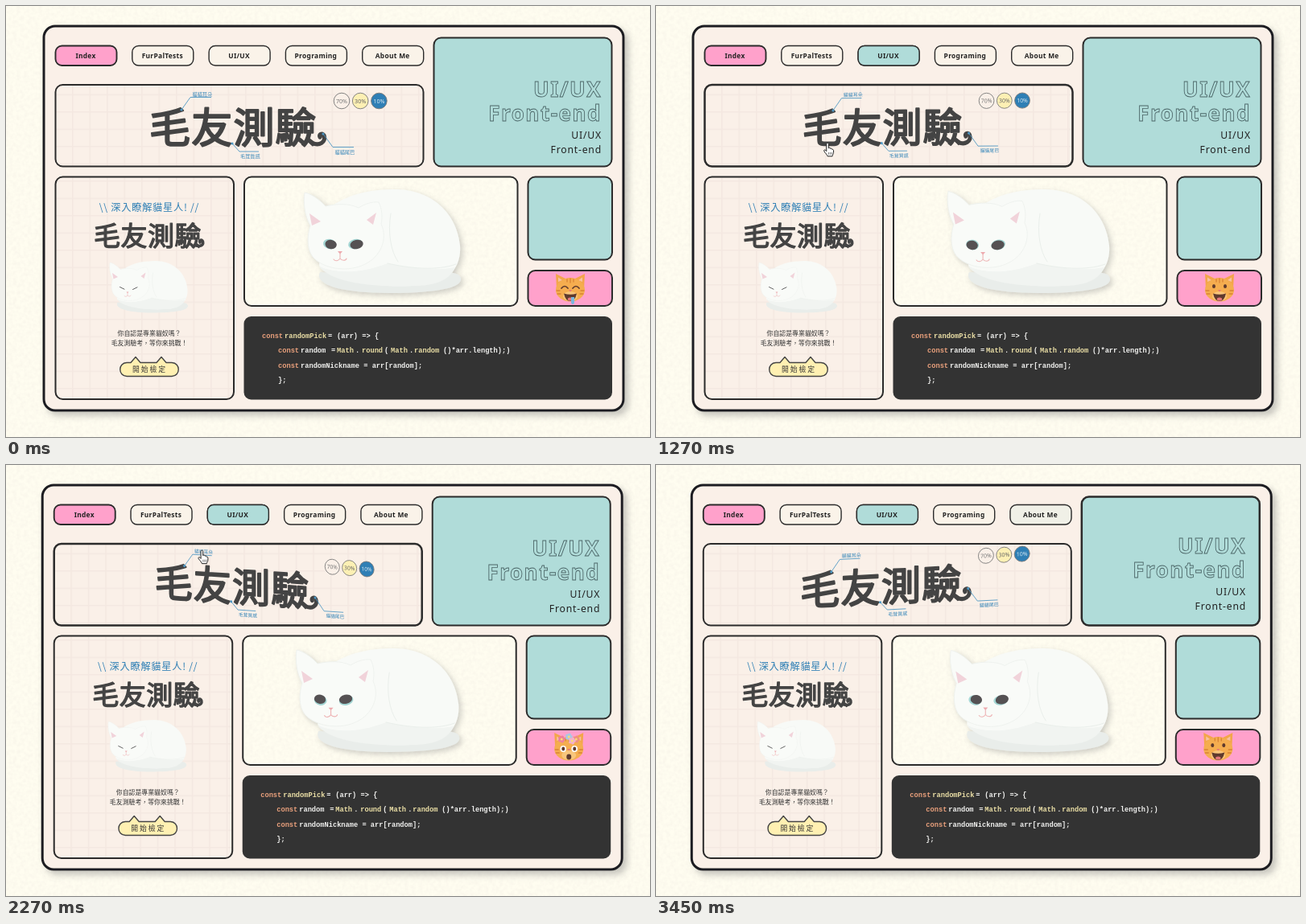
Animation, 800 px wide and 536 px high, one loop 3540 ms. Source, as an HTML page:

```html
<!DOCTYPE html>
<html lang="zh-Hant">
<head>
<meta charset="utf-8">
<title>Cat quiz portfolio</title>
<style>
  html, body { margin: 0; width: 100%; height: 100%; overflow: hidden; background: #fffdf0; }
  svg { display: block; width: 800px; height: 536px; font-family: "Noto Sans", "Noto Sans CJK TC", "Noto Sans CJK JP", sans-serif; }
  .cjk { font-family: "Noto Sans CJK TC", "Noto Sans CJK JP", sans-serif; }
  .box { stroke: #2b2b2b; stroke-width: 2; }
  .nav text { font-size: 8.4px; font-weight: 600; letter-spacing: .3px; text-anchor: middle; fill: #222; }
  .nav rect { stroke: #2b2b2b; stroke-width: 1.4; }
  .brush { fill: #444; stroke: #444; stroke-width: .042em; stroke-linejoin: round; font-weight: 400; }
  .curl { fill: none; stroke: #444; stroke-width: 5.2; stroke-linecap: round; }
  .note { fill: #3485b8; font-size: 6.2px; }
  .lead { fill: none; stroke: #4f98c4; stroke-width: .9; }
  .pct { font-size: 7.2px; text-anchor: middle; }
  .body { font-size: 7.9px; font-weight: 500; fill: #333; text-anchor: middle; }
  .big { font-size: 26px; font-weight: 700; letter-spacing: 1.5px; fill: #b0dcd9; stroke: #4a6466; stroke-width: .85; }
  .sub { font-size: 12.2px; font-weight: 500; letter-spacing: .8px; fill: #222; }
  .code { font: 700 8.7px "Liberation Mono", monospace; fill: #f0f0ee; }
  .code .k { fill: #e9a07c; }
  .code .f { fill: #ebdfa6; }
  .fine { fill: none; stroke-linecap: round; stroke-linejoin: round; }
</style>
</head>
<body>
<svg viewBox="0 0 800 536">
  <defs>
    <pattern id="grid" width="21.5" height="21.5" x="17.5" y="2" patternUnits="userSpaceOnUse">
      <path d="M0 .8H21.5M.8 0V21.5" stroke="#f4e8e1" stroke-width="1.5"/>
    </pattern>
    <filter id="paper" x="0" y="0" width="100%" height="100%">
      <feTurbulence type="fractalNoise" baseFrequency=".22" numOctaves="2" seed="4"/>
      <feColorMatrix values="0 0 0 0 .94  0 0 0 0 .91  0 0 0 0 .82  1.5 0 0 0 -.5"/>
    </filter>
    <filter id="soft" x="-20%" y="-20%" width="140%" height="140%">
      <feDropShadow dx="3" dy="3" stdDeviation="3.5" flood-color="#777" flood-opacity=".36"/>
    </filter>
    <filter id="lift" x="-10%" y="-10%" width="120%" height="120%">
      <feDropShadow dx="5" dy="5" stdDeviation="4" flood-color="#777" flood-opacity=".42"/>
    </filter>
  </defs>
  <rect width="800" height="536" fill="#fffdf0"/>
  <rect width="800" height="536" filter="url(#paper)"/>

  <g id="page">
    <rect x="47" y="25" width="720" height="478" rx="14" fill="#faf0e8" stroke="#1e1f20" stroke-width="3" filter="url(#lift)"/>
    <g id="nav" class="nav"></g>

    <rect id="banner" class="box" x="61.5" y="98" width="457" height="101.5" rx="9" fill="url(#grid)"/>
    <g id="tilt"></g>

    <rect id="hero" class="box" x="531.5" y="39.5" width="221" height="160" rx="9" fill="#b0dcd9"/>
    <g id="heroText" text-anchor="end">
      <text class="big" x="740" y="112.5">UI/UX</text>
      <text class="big" x="740" y="143">Front-end</text>
      <text class="sub" x="740" y="165">UI/UX</text>
      <text class="sub" x="740" y="182.5">Front-end</text>
    </g>

    <rect class="box" x="61.5" y="212.5" width="221.5" height="276.5" rx="9" fill="url(#grid)"/>
    <g id="card"></g>

    <rect x="296" y="212.5" width="339.5" height="160.5" rx="9" fill="#fffdf0"/>
    <rect x="299" y="215" width="333" height="155" filter="url(#paper)"/>
    <rect class="box" x="296" y="212.5" width="339.5" height="160.5" rx="9" fill="none"/>
    <g id="cat" filter="url(#soft)"></g>

    <rect class="box" x="648.5" y="212.5" width="104.5" height="103" rx="9" fill="#b0dcd9"/>
    <rect class="box" x="648.5" y="329" width="104.5" height="44" rx="9" fill="#ffa1cb"/>
    <g id="emoji"></g>

    <rect x="295.5" y="386" width="457.5" height="103.5" rx="9" fill="#333"/>
    <g id="code" class="code"></g>
  </g>

  <g id="hand">
    <path d="M-3.3 -7C-3.3 -9 -.7 -9 -.7 -7V-2C0 -3 1.700 -2.700 1.700 -1.400C2.500 -2 3.900 -1.500 3.900 -.3C4.800 -.7 5.500 0 5.500 1V3.500C5.500 5.500 4.200 6 4 8H-2C-2.500 5.800 -4.500 4.600 -6.100 2C-7.100 .2 -5.300 -.5 -4.300 .6L-3.300 1.800Z" fill="#fff" stroke="#222"/>
    <path d="M-.5 3V6M1.5 3V6M3.5 3V6" stroke="#222" stroke-width=".6"/>
  </g>
</svg>

<script>
const LOOP = 3540, STEPS = 39;
const $ = id => document.getElementById(id);
const text = (x, y, s, attrs = '') => `<text x="${x}" y="${y}" ${attrs}>${s}</text>`;
const path = (d, fill, attrs = '') => `<path d="${d}" fill="${fill}" ${attrs}/>`;
const line = (d, color, w) => `<path class="fine" d="${d}" stroke="${color}" stroke-width="${w}"/>`;
const oval = (x, y, rx, ry, fill, attrs = '') =>
  `<ellipse cx="${x}" cy="${y}" rx="${rx}" ry="${ry}" fill="${fill}" ${attrs}/>`;

const TITLE = '毛友測驗';

// Navigation
$('nav').innerHTML = ['Index', 'FurPalTests', 'UI/UX', 'Programing', 'About Me'].map((s, i) => {
  const x = 61.5 + i * 95.3;
  const rect = (fill, more = '') => `<rect x="${x}" y="49.5" width="76" height="24.5" rx="8" fill="${fill}" ${more}/>`;
  return rect(i ? '#faf3e9' : '#ffa1cb', i ? '' : 'style="stroke-width:1.9"') +
    (i == 2 ? rect('#b0dcd9', 'id="active"') : i == 4 ? rect('#b0dcd9', 'id="about"') : '') +
    text(x + 37.5, 64.5, s);
}).join('');

// Banner lettering, colour dots and callouts
const dots = [['#faf0e8', '#777', '70%'], ['#fdf0b4', '#666', '30%'], ['#2f7fb5', '#d7e8f2', '10%']];
$('tilt').innerHTML =
  text(178, 170, TITLE, 'class="brush cjk" font-size="51" letter-spacing="1.2"') +
  '<path class="curl" d="M380 170C389 175 398 169 395 161C393 157 388 160 390 163"/>' +
  dots.map(([fill, tint, s], i) => oval(417 + i * 23.2, 118, 9.8, 9.8, fill, 'stroke="#777" stroke-width=".9"') +
    text(417 + i * 23.2, 120.6, s, `class="pct" fill="${tint}"`)).join('') +
  '<path class="lead" d="M218 129L229 113.5H255M281 171L290 181H314M394 159L406 175.5H432"/>' +
  [[218, 129], [281, 171], [394, 159]].map(([x, y]) => oval(x, y, 1.6, 1.6, '#4f98c4')).join('') +
  text(231.5, 111.5, '貓貓耳朵', 'class="note cjk"') +
  text(291, 189.3, '毛茸質感', 'class="note cjk"') +
  text(408.5, 183.5, '貓貓尾巴', 'class="note cjk"');

// Cat, shared by the large panel and the card
function cat(asleep) {
  const ear = d => path(d, '#f1d3da');
  const eye = (x, rx, turn) => {
    const spin = `transform="rotate(${turn} ${x} 296)"`;
    return asleep
      ? line(`M${x - 6} ${296 - turn / 4}L${x + 5} ${296 + turn / 5}`, '#555', 1.8)
      : oval(x, 296, rx + .8, 6.2, '#a3d5d3', spin) + `<g class="pupil">${oval(x, 296, rx, 5.7, '#555152', spin)}</g>`;
  };
  return path('M390 331C382 347 418 357 475 357C532 357 567 351 565 339C563 329 545 331 530 336Z', '#e9edea') +
    path('M393 258C420 234 450 228 485 228C530 229 560 258 564 298C566 327 548 347 505 348C455 350 410 342 389 323Z', '#f8faf7') +
    path('M389 324C412 333 440 333 474 320C500 326 532 330 558 325C550 343 530 348 505 348C455 350 405 344 389 324Z', '#f1f4f1') +
    line('M474 320C500 326 535 330 559 321M478 258C474 282 478 305 487 318', '#eaefeb', 1) +
    `<g class="head">` +
    path('M371 232C378 233 389 240 397 249C410 246 426 245 438 251C446 246 455 243 463 244C467 252 468 262 466 271C475 290 465 312 446 321C427 331 397 328 383 314C373 304 374 286 378 273C371 261 369 244 371 232Z', '#f9fbf8', 'stroke="#ecf0ed" stroke-width=".8"') +
    ear('M377 258L391 268L380 273Z') + ear('M460 257L448 266L456 272Z') +
    `</g><g class="face">` + eye(402, 7.2, 12) + eye(434, 8.2, -12) +
    path('M412 305H418L415 308.5Z', '#eda9ad') +
    line('M415 308V314C413 317 409 318 407 315M415 314C417 317 422 317 423 314', '#eeb3b4', 1.1) + `</g>`;
}
$('cat').innerHTML = cat(false);

// Left card
$('card').innerHTML =
  text(178, 254.5, '\\\\ 深入瞭解貓星人! //', 'class="cjk" fill="#2f7fb5" font-size="12.2" font-weight="500" letter-spacing=".75" text-anchor="middle"') +
  text(109, 297.5, TITLE, 'class="brush cjk" font-size="33" letter-spacing=".5"') +
  '<path class="curl" style="stroke-width:3.6" d="M235 297.5C241 300 247 297 244 292C242 290 240 292 241 294"/>' +
  `<g transform="translate(-56.5 203) scale(.5)">${cat(true)}</g>` +
  text(178, 409.8, '你自認是專業貓奴嗎？', 'class="cjk body"') +
  text(178, 421.8, TITLE + '考，等你來挑戰！', 'class="cjk body"') +
  path('M150 443.5H155L161 436.5L167 443.5H187L193 436.5L199 443.5H206C217 444 217 460 206 460.5H150C139 460 139 444 150 443.5Z', '#fff0b2', 'stroke="#444" stroke-width="1.4" stroke-linejoin="round"') +
  text(178.5, 455.2, '開始檢定', 'class="cjk" font-size="8.8" font-weight="500" letter-spacing="1.9" fill="#333" text-anchor="middle"');

// Code block: [x, text, class]
$('code').innerHTML = [
  [[318, 'const', 'k'], [346, 'randomPick', 'f'], [400, '='], [411, '(arr) =&gt; {']],
  [[338, 'const', 'k'], [366, 'random'], [404, '='], [411, 'Math', 'f'], [434, '.'], [442, 'round', 'f'],
   [470, '('], [478, 'Math', 'f'], [501, '.'], [507, 'random', 'f'], [543, '()*arr.length);)']],
  [[338, 'const', 'k'], [366, 'randomNickname = arr[random];']],
  [[338, '};']]
].map((row, i) => row.map(([x, s, c = '']) => text(x, 412.7 + i * 18.4, s, `class="${c}"`)).join('')).join('');

// Emoji faces
const ink = '#5f3a2d';
const head =
  path('M684 352L683 333L695 339Q701 337 707 339L719 333L718 352Z', '#f3a64a') +
  path('M686 343L686 337.5L691 341ZM716 343L716 337.5L711 341Z', '#f8c2a0') +
  oval(701, 353, 18, 14.5, '#f5ad4f') + oval(701, 361, 9, 6, '#f8c67c') +
  line('M701 339V344M697 340V343M705 340V343M684 354H688M685 358H689M714 354H718M713 358H717', '#d98335', 1.3);
const nose = path('M699 353H703L701 355.5Z', '#e5777b');
const grin = path('M693 357.5Q701 360 709 357.5Q707 367 701 367Q695 367 693 357.5Z', ink) + oval(701, 364.5, 3.2, 2, '#e5777b');
const open = oval(694, 348.5, 2, 2.6, ink) + oval(708, 348.5, 2, 2.6, ink);
const shut = line('M690 351Q694 346 698 351M704 351Q708 346 712 351', ink, 1.7);
const flower = (x, y, c) => [0, 1, 2, 3, 4].map(i =>
  oval(x + 2.6 * Math.cos(i * 1.257), y + 2.6 * Math.sin(i * 1.257), 2, 2, c)).join('') + oval(x, y, 1.5, 1.5, '#f8dd73');
const faces = {
  drool: head + shut + nose + grin + path('M702 362H706V368Q706 371 704 371Q702 371 702 368Z', '#79b7df'),
  laugh: `<g transform="rotate(12 701 352)">${head + shut + nose + grin}</g>` +
    path('M701 358Q708 354 713 362L709 369Q703 368 701 358Z', '#e58f42') + path('M682 366Q688 360 694 364Q689 368 682 366Z', '#71b4df'),
  smirk: `<g transform="rotate(-8 701 352)">${head + open + nose + line('M694 360Q704 365 709 357', ink, 1.6)}</g>`,
  grin: head + open + nose + grin,
  cross: head + line('M689 345L697 350L689 353M713 345L705 350L713 353M691 360L695 363L701 358L707 363L711 360', ink, 1.9) + nose,
  flower: head + oval(694, 353, 3.8, 4, '#fff') + oval(708, 353, 3.8, 4, '#fff') + oval(694, 353, 2, 2.4, ink) + oval(708, 353, 2, 2.4, ink) +
    oval(701, 363, 3, 3.4, ink) + nose + flower(692, 341, '#ef7f9f') + flower(701, 338, '#a9c8e4') + flower(710, 341, '#ef8f83') + flower(705, 343, '#f4b0cd')
};
const moods = [[0, 'drool'], [180, 'laugh'], [630, 'smirk'], [1260, 'grin'], [1720, 'cross'], [2260, 'flower'], [2990, 'grin']];

// Motion: linear keys in ms
const beats = [0, 360, 910, 1550, 1910, 2550, 3450];
const tracks = {
  sx:   [1, .989, .963, .954, .938, .911, .966],
  sy:   [1, .985, .97, .985, .965, .97, .97],
  skew: [0, -.005, -.0435, .022, .068, .053, -.048],
  hx:   [0, -3, -6, -8, -8.5, -8, -2],
  hy:   [0, -.5, -1, -2, -2, -2, -1.5],
  fx:   [0, -3.5, -6.5, -9, -10.5, -9, -3],
  fy:   [0, 1, 1.5, .5, -2.5, -4, -3.5],
  px:   [1.6, .8, .5, -1.2, -1.2, 0, 1.6],
  py:   [.5, .5, .5, .5, -1.2, -1.6, -.8],
  cx:   [490, 475, 303, 147, 164, 309, 480],
  cy:   [60, 174, 198, 164, 118, 112, 90]
};
function mix(keys, vals, t) {
  let i = 0;
  while (i < keys.length - 2 && t > keys[i + 1]) i++;
  const u = Math.min(1, Math.max(0, (t - keys[i]) / (keys[i + 1] - keys[i])));
  return vals[i] + (vals[i + 1] - vals[i]) * u;
}
const move = (el, x, y) => el.setAttribute('transform', `translate(${x} ${y})`);
const headEl = $('cat').querySelector('.head'), faceEl = $('cat').querySelector('.face');
const pupils = $('cat').querySelectorAll('.pupil');
let mood = '';

function draw(t) {
  const v = {};
  for (const k in tracks) v[k] = mix(beats, tracks[k], t);
  move($('page'), -2.7 * t / 3450, 0);
  $('tilt').setAttribute('transform', `translate(288 150) matrix(${v.sx} ${v.skew} 0 ${v.sy} 0 0) translate(-288 -150)`);
  move(headEl, v.hx, v.hy);
  move(faceEl, v.fx, v.fy);
  pupils.forEach(p => move(p, v.px, v.py));

  const pull = mix([0, 180, 360, 600, 3180, 3450], [0, .6, .4, 0, 0, 1], t);
  move($('heroText'), -4.3 * pull, -2.8 * pull);
  $('active').style.opacity = mix([300, 360, 640], [0, .12, 1], t);
  $('about').style.opacity = mix([90, 200, 360, 600, 3080, 3270, 3450], [0, .9, .5, 0, 0, .6, .12], t);

  const inBanner = t > 300 && t < 3200;
  $('banner').style.strokeWidth = inBanner ? 2.5 : 2;
  $('hero').style.strokeWidth = t > 3300 ? 2.5 : 2;
  $('hand').style.display = inBanner ? '' : 'none';
  move($('hand'), v.cx, v.cy);

  const next = moods.filter(m => m[0] <= t).pop()[1];
  if (next != mood) $('emoji').innerHTML = faces[mood = next];
}

const start = performance.now();
function tick(now) {
  const t = Math.max(0, now - start) % LOOP, step = LOOP / STEPS;
  draw(Math.min(STEPS - 1, Math.floor((t + 3.5) / step)) * step);
  requestAnimationFrame(tick);
}
draw(0);
requestAnimationFrame(tick);
</script>
</body>
</html>
```
